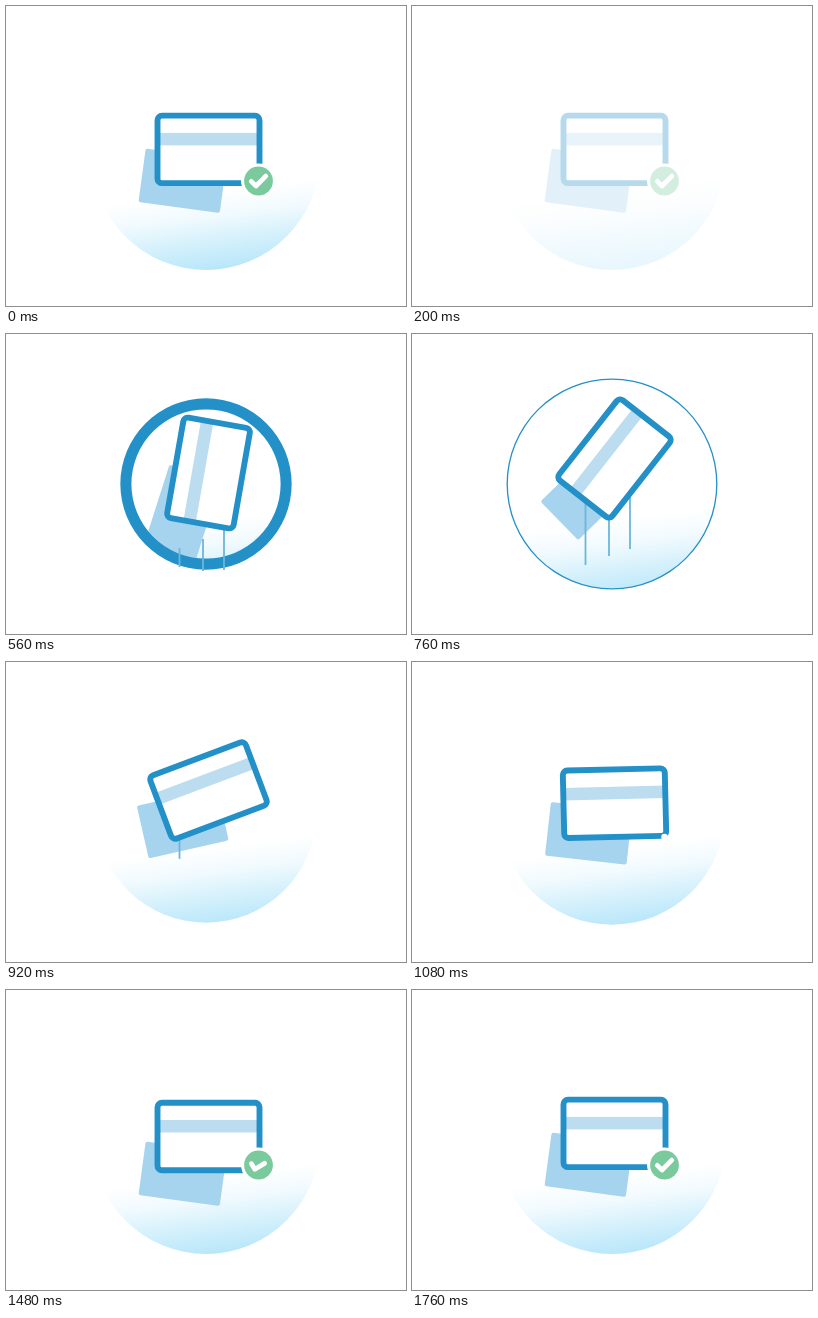
Write an HTML page with a canvas that moves like this. It is 400 px wide and 300 px high and loops after 1.8 s.

```html
<!DOCTYPE html>
<html lang="en">
<head>
<meta charset="utf-8">
<title>Card confirmed</title>
<style>
html, body { margin: 0; width: 100%; height: 100%; overflow: hidden; background: #fff; }
canvas { display: block; width: 400px; height: 300px; }
</style>
</head>
<body>
<canvas id="stage" width="400" height="300"></canvas>
<script>
const ctx = document.getElementById('stage').getContext('2d');
const LOOP = 1800, STEP = 40, FADE = 300;
const BLUE = '#2490c8', STRIPE = '#bcdcf0', SHADE = '#a6d4ee', GREEN = '#7aca9d';

const progress = (t, from, to) => Math.min(1, Math.max(0, (t - from) / (to - from)));
const sine = p => (1 - Math.cos(Math.PI * p)) / 2;
const cubicOut = p => 1 - (1 - p) ** 3;
const ease = (t, from, to, a, b) => a + (b - a) * sine(progress(t, from, to));

const floorTint = ctx.createLinearGradient(192, 187, 202, 266);
for (const [stop, alpha] of [[0, 0], [.3, .17], [.6, .5], [1, .92]])
  floorTint.addColorStop(stop, `rgba(176,228,249,${alpha})`);

// Leap up from below, fall past the resting height, then settle.
function height(t, leap, top, low, rest, landed, settled) {
  if (t < 800) return top + leap * (1 - progress(t, 400, 800)) ** 4;
  if (t < landed) return ease(t, 800, landed, top, low);
  return ease(t, landed, settled, low, rest);
}

function disc(x, y, r, color) {
  ctx.beginPath();
  ctx.arc(x, y, Math.max(0, r), 0, 7);
  ctx.fillStyle = color;
  ctx.fill();
}

function box(w, h, r, color) {
  ctx.beginPath();
  ctx.roundRect(-w / 2, -h / 2, w, h, r);
  ctx.fillStyle = color;
  ctx.fill();
}

function place(x, y, degrees, draw) {
  ctx.save();
  ctx.translate(x, y);
  ctx.rotate(degrees * Math.PI / 180);
  draw();
  ctx.restore();
}

function inCircle(r, draw) {
  ctx.save();
  ctx.beginPath();
  ctx.arc(200, 150, r, 0, 7);
  ctx.clip();
  draw();
  ctx.restore();
}

function drawCard() {
  box(102, 67.5, 4.5, '#fff');
  ctx.fillStyle = STRIPE;
  ctx.fillRect(-51, -16.5, 102, 12.5);
  ctx.beginPath();
  ctx.roundRect(-51, -33.75, 102, 67.5, 4.5);
  ctx.strokeStyle = BLUE;
  ctx.lineWidth = 5.9;
  ctx.stroke();
}

// Each trail: x, base, start of growth, start of retreat.
function drawTrails(t) {
  ctx.strokeStyle = '#6cb5dc';
  ctx.lineWidth = 1.8;
  ctx.lineCap = 'butt';
  for (const [x, base, grow, retreat] of [[173.5, 233, 522, 710], [197, 237, 496, 625], [218, 236, 480, 600]]) {
    const top = Math.max(145, base - Math.max(0, t - grow) / 2);
    const bottom = base - 21 * (Math.max(0, t - retreat) / 160) ** 2;
    if (bottom <= top) continue;
    ctx.beginPath();
    ctx.moveTo(x, top);
    ctx.lineTo(x, bottom);
    ctx.stroke();
  }
}

function drawBadge(t) {
  const size = cubicOut(progress(t, 1080, 1515));
  disc(252.5, 175, 17.5 * cubicOut(progress(t, 1050, 1500)), '#fff');
  disc(252.5, 175, 14.4 * size, GREEN);
  const drawn = sine(progress(t, 1240, 1560));
  if (!drawn) return;
  place(252.5, 175, ease(t, 1280, 1600, 45, 0), () => {
    ctx.scale(size, size);
    ctx.beginPath();
    ctx.moveTo(-7.2, .4);
    ctx.lineTo(-2.5, 5);
    ctx.lineTo(7.3, -4.9);
    ctx.setLineDash([21 * drawn, 30]);
    ctx.strokeStyle = '#fff';
    ctx.lineWidth = 4.8;
    ctx.lineCap = ctx.lineJoin = 'round';
    ctx.stroke();
  });
}

function drawScene(t) {
  const outer = Math.max(0, 114 * (1 - Math.exp(-.006 * (t - 328))));
  const band = (Math.max(0, 865 - t) * .0109) ** 2;
  const inner = Math.max(0, outer - band);
  const turn = ease(t, 497, 1132, -82, 0);

  inCircle(inner, () => {
    ctx.fillStyle = floorTint;
    ctx.fillRect(80, 170, 240, 100);
    place(176.7, height(t, 153, 158.2, 186, 174.8, 1380, 1720), turn + 7.7, () => box(82, 54, 2, SHADE));
  });
  if (band > 0 && outer > 0) {
    ctx.beginPath();
    ctx.arc(200, 150, outer, 0, 7);
    ctx.arc(200, 150, inner, 0, 7);
    ctx.fillStyle = BLUE;
    ctx.fill('evenodd');
  }
  drawTrails(t);
  inCircle(inner, () => place(202.5, height(t, 112, 124.5, 149.5, 143.4, 1260, 1700), turn, drawCard));
  drawBadge(t);
}

function frame() {
  const t = Math.floor(performance.now() % LOOP / STEP) * STEP;
  ctx.globalAlpha = 1;
  ctx.fillStyle = '#fff';
  ctx.fillRect(0, 0, 400, 300);
  drawScene(t < FADE ? t + LOOP : t);
  // The finished scene fades to white before the next round.
  if (t < FADE) {
    ctx.globalAlpha = t / FADE;
    ctx.fillStyle = '#fff';
    ctx.fillRect(0, 0, 400, 300);
  }
  requestAnimationFrame(frame);
}
frame();
</script>
</body>
</html>
```
